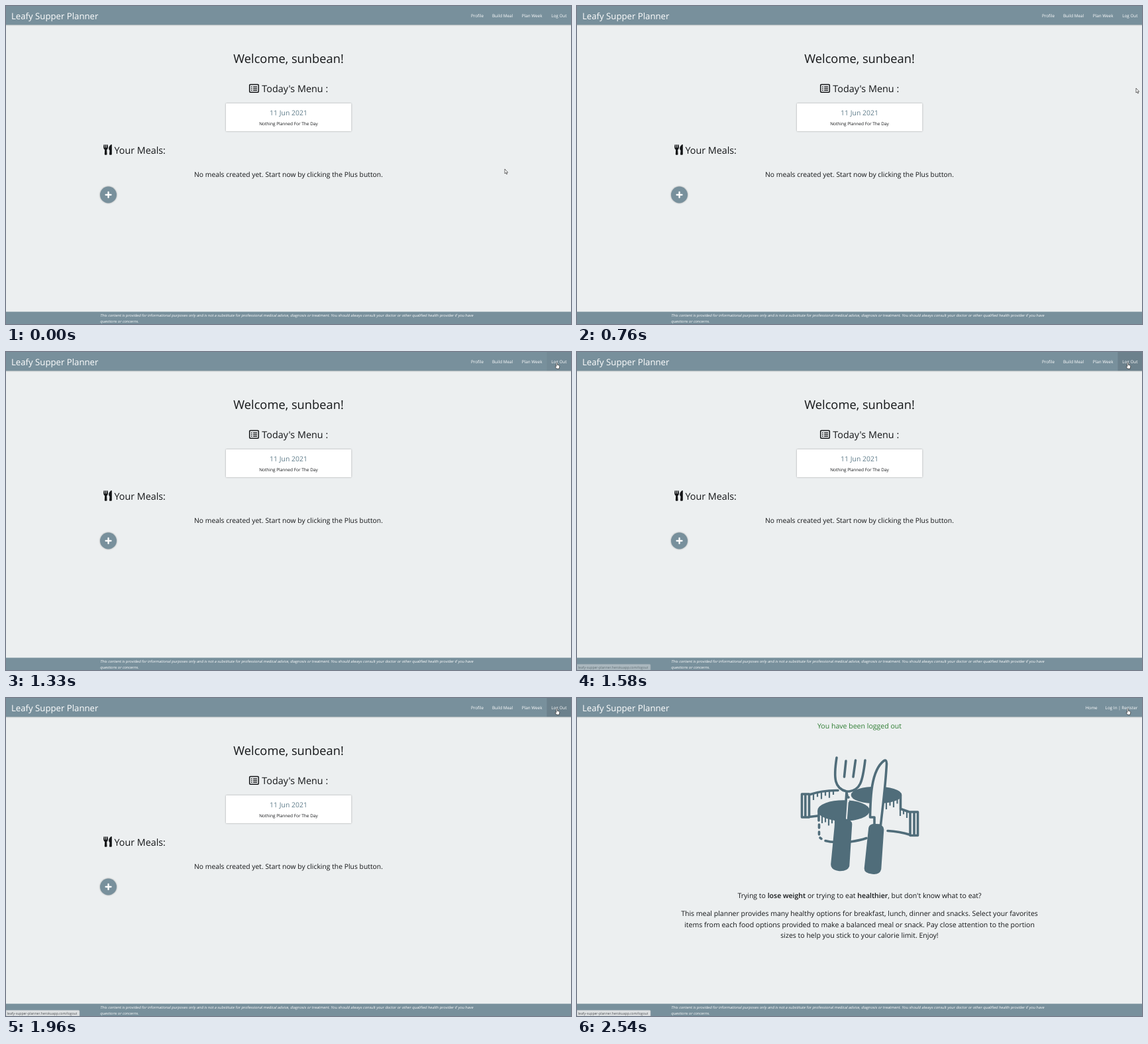
Write an HTML page that moves like this. It is 853 px wide and 480 px high and loops after 2670 ms.

```html
<!DOCTYPE html>
<html lang="en">
<head>
<meta charset="utf-8">
<title>Leafy Supper Planner</title>
<style>
  html, body { margin: 0; width: 100%; height: 100%; overflow: hidden; background: #eceff0; }
  svg { display: block; width: 100vw; height: 100vh; }
  text { font-family: "Open Sans", "Noto Sans", sans-serif; fill: #141618; text-rendering: geometricPrecision; white-space: pre; }
  .mid { text-anchor: middle; }
  .end { text-anchor: end; }
  .nav text, .foot text { fill: #fff; }
  .nav { font-size: 6.35px; }
  .foot { font-size: 5.52px; }
  .body { font-size: 10.53px; }
  .lift { filter: drop-shadow(0 .8px .8px rgba(0,0,0,.35)); }
  .art { fill: none; stroke: #506d7a; stroke-width: 3.6; stroke-linecap: round; stroke-linejoin: round; }
  .art .solid { fill: #506d7a; }
  .art .clear { fill: #eceff0; }
  .art .thin { stroke-width: 2.2; stroke-linecap: butt; }
</style>
</head>
<body>
<svg viewBox="0 0 853 480" preserveAspectRatio="none">
  <rect width="853" height="480" fill="#eceff0"/>

  <g class="lift"><rect x="-4" y="-4" width="861" height="32.4" fill="#78909c"/></g>
  <rect id="hover" x="816.5" y="0" width="36.5" height="28.4" opacity="0"/>
  <g class="nav">
    <text x="8" y="19.8" font-size="13.2">Leafy Supper Planner</text>
    <g id="navIn">
      <text x="702" y="17">Profile</text>
      <text x="734" y="17">Build Meal</text>
      <text x="778.8" y="17">Plan Week</text>
      <text class="end" x="846.5" y="17">Log Out</text>
    </g>
    <g id="navOut">
      <text x="767.7" y="17">Home</text>
      <text class="end" x="846.3" y="17">Log In | Register</text>
    </g>
  </g>

  <g id="home">
    <text class="mid" x="426.5" y="86" font-size="18.3">Welcome, sunbean!</text>
    <g fill="none" stroke="#141618" stroke-width="1.5">
      <rect x="367.7" y="118.4" width="13.6" height="11.8" rx="1.2"/>
      <path d="M370 121.8h1.6m1.5 0h6M370 124.4h1.6m1.5 0h6M370 127h1.6m1.5 0h6" stroke-width="1.3"/>
    </g>
    <text x="386.3" y="129.8" font-size="14.4">Today's Menu :</text>
    <rect class="lift" x="332" y="147" width="189.3" height="42" rx="1" fill="#fff"/>
    <text class="mid" x="426.5" y="164.8" font-size="10.45" style="fill:#607d8b">11 Jun 2021</text>
    <text class="mid" x="426.5" y="180.3" font-size="6.5">Nothing Planned For The Day</text>
    <g fill="#141618">
      <path d="M147.6 209.2h1.2v4.6h.9v-4.6h1.6v4.6h.9v-4.6h1.3q1.6 6.6-1.4 7.8l.4 6.6q0 1.2-1 1.2h-1.7q-1 0-1-1.2l.4-6.6q-3.1-1.3-1.6-7.8z"/>
      <path d="M159.8 209.8v14q0 1-1 1h-1.9q-1 0-.9-1l.5-5.6q-3.4-3.6 1-8.2 1.300-1.200 2.300-.8z"/>
    </g>
    <text x="163.5" y="222.5" font-size="14.3">Your Meals:</text>
    <text class="mid" x="426.5" y="257.8" font-size="10.37">No meals created yet. Start now by clicking the Plus button.</text>
    <circle class="lift" cx="154.5" cy="285" r="12.5" fill="#78909c"/>
    <path d="M150.600 285h7.900M154.550 281v8" stroke="#fff" stroke-width="2.300" stroke-linecap="round"/>
  </g>

  <g id="bye">
    <text class="mid" x="426.5" y="46" font-size="10.55" style="fill:#2e7d32">You have been logged out</text>
    <g class="art">
      <path d="M339.500 145h11v35h-11zM344.800 145v35M350.500 146Q371 139 394 139.500M350.500 179.500 363 178M503 172h11.500v35.500H503zM509 172v35.500M489 167.500 503 172.500M469 200.500Q487 201.500 503 206.500"/>
      <ellipse class="solid" cx="452" cy="146.500" rx="36.500" ry="11"/>
      <path d="M488.500 147v21"/>
      <ellipse class="solid" cx="402.500" cy="170" rx="37.500" ry="14"/>
      <path d="M365 171v14"/>
      <path d="M365.500 191v5M365.500 202v4M367 211l2 1.500M375 215.500Q382 217.500 390 217.500M413 217Q427 215 437 211.500"/>
      <path id="ticks" class="thin"/>
      <path class="clear" d="M392 90C387 122 389 137 407 141L411 141C427 139 431 128 435 94"/>
      <path d="M406 95 403.500 119M420.500 94 417 119"/>
      <path class="clear" d="M407 142 404 185H409.500L411.500 158M407 142Q408 151 410 150"/>
      <path class="solid" d="M391 189Q392 183 402 183.500 414 185 413.500 191L409.500 253Q408 260 396 259.500 385 258 385 251z"/>
      <path class="clear" d="M442.500 180C443 150 444 110 463 95Q467.500 92 467.500 99C466 130 462 160 458.500 192H449V180z"/>
      <path class="solid" d="M442 196Q443 191 452 192 462 193 461.500 199L457.500 258Q456 265 446 264 435 263 435.500 257z"/>
    </g>
    <g class="body">
      <text class="mid" x="426.5" y="301.8">Trying to <tspan font-weight="600">lose weight</tspan> or trying to eat <tspan font-weight="600">healthier</tspan>, but don't know what to eat?</text>
      <text class="mid" x="426.5" y="329">This meal planner provides many healthy options for breakfast, lunch, dinner and snacks. Select your favorites</text>
      <text class="mid" x="426.5" y="345.500">items from each food options provided to make a balanced meal or snack. Pay close attention to the portion</text>
      <text class="mid" x="426.5" y="362">sizes to help you stick to your calorie limit. Enjoy!</text>
    </g>
  </g>

  <rect y="461.500" width="853" height="18.500" fill="#78909c"/>
  <g class="foot">
    <text transform="translate(142 469.300) skewX(-11)">This content is provided for informational purposes only and is not a substitute for professional medical advice, diagnosis or treatment. You should always consult your doctor or other qualified health provider if you have</text>
    <text transform="translate(142 478.300) skewX(-11)">questions or concerns.</text>
  </g>
  <g id="status">
    <path d="M0 471.300H109.500Q111 471.300 111 472.800V480H0z" fill="#dee1e3" stroke="#b4babd" stroke-width=".5"/>
    <text x="1.800" y="477.500" font-size="5.1" style="fill:#44484b">leafy-supper-planner.herokuapp.com/logout</text>
  </g>

  <path id="arrow" d="M0 0V7L1.600 5.600 2.700 8 3.700 7.500 2.700 5.200H4.700z" fill="#fff" stroke="#222" stroke-width=".65"/>
  <path id="hand" d="M-.8 5.600V.7Q0-.5.8.7V3.600L3.200 4.100Q4.300 4.500 4.100 6L3.400 9.300H-.3L-2.700 6Q-2.400 4.700-.8 5.900z" fill="#fff" stroke="#222" stroke-width=".65"/>
</svg>
<script>
const LOOP = 2670, LOGOUT = 2350;
const $ = id => document.getElementById(id);
const show = (id, on) => $(id).style.display = on ? "" : "none";
const ramp = (t, a, b) => Math.min(1, Math.max(0, (t - a) / (b - a)));
const smooth = u => u * u * (3 - 2 * u);

// pointer stops: time, x, y
const stops = [[0, 753, 246], [190, 753.5, 245], [380, 758.5, 237.5], [760, 844, 124], [1140, 832, 37.5], [1330, 831.7, 16]];

function pointer(t) {
  let i = 0;
  while (i < stops.length - 2 && t >= stops[i + 1][0]) i++;
  const [a, b] = [stops[i], stops[i + 1]];
  const u = smooth(ramp(t, a[0], b[0]));
  return [a[1] + (b[1] - a[1]) * u, a[2] + (b[2] - a[2]) * u];
}

// tape measure marks hanging from the edges
function tapeMarks() {
  let d = "";
  for (let i = 0; i < 6; i++) {
    const len = i % 2 ? 6 : 10;
    d += `M${357 + i * 6} ${144 - i * .8}v${len}`;
    d += `M${370 + i * 5} ${177 + Math.sqrt(i) * 2.5}v${len + 2}`;
    if (i < 4) d += `M${467 + i * 5.5} ${156 - i * 1.5}v${len + 2}`;
    if (i < 3) d += `M${488 + i * 5} ${168 + i * 1.5}v${len}`;
  }
  return d;
}

function draw(t) {
  const out = t >= LOGOUT;
  const step = t - t % 190 + (t % 190 >= 60 ? 60 : 0);
  const [x, y] = pointer(step);
  const over = y < 28;
  for (const id of ["home", "navIn"]) show(id, !out);
  for (const id of ["bye", "navOut"]) show(id, out);
  show("arrow", !over);
  show("hand", over);
  $(over ? "hand" : "arrow").setAttribute("transform", `translate(${x} ${y})`);
  $("hover").setAttribute("opacity", out ? 0 : .1 * ramp(step, 1200, 1520));
  $("status").setAttribute("opacity", ramp(step, 1460, 1700));
}

$("ticks").setAttribute("d", tapeMarks());
const start = performance.now();
function frame() {
  draw((performance.now() - start) % LOOP);
  requestAnimationFrame(frame);
}
frame();
</script>
</body>
</html>
```
